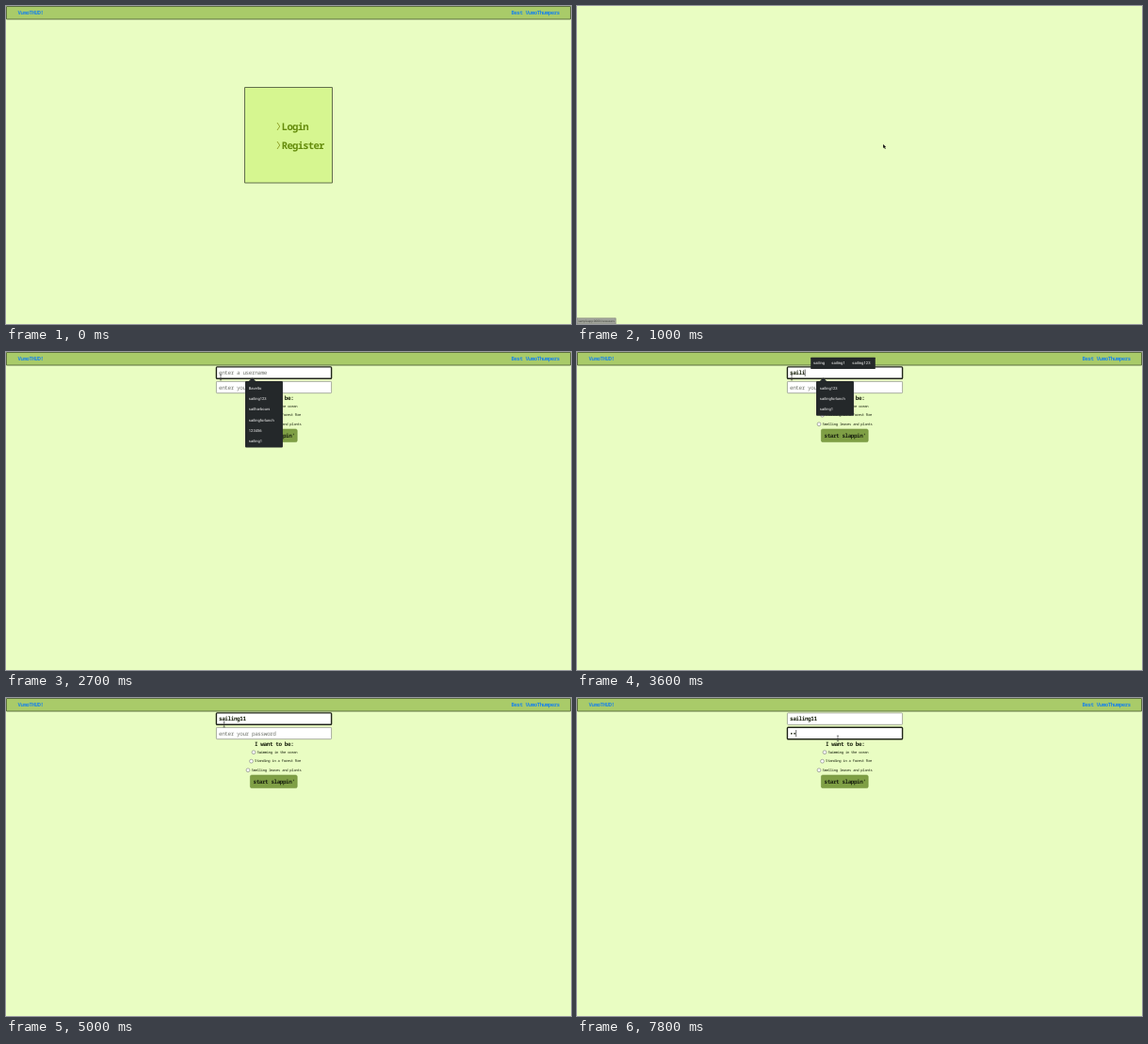
Recreate the animation shown at these times as an HTML page with a canvas. Size 600 by 338 pixels, loop 8 s.

```html
<!DOCTYPE html>
<html lang="en">
<head>
<meta charset="utf-8">
<title>Sign-up form</title>
<style>
  html, body { margin: 0; height: 100%; overflow: hidden; background: #e9fdc2; }
  canvas { display: block; width: 600px; height: 338px; }
</style>
</head>
<body>
<canvas id="stage"></canvas>
<script>
const LOOP = 8000;
const MONO = '"Noto Sans Mono", "DejaVu Sans Mono", monospace';
const SANS = 'Roboto, "Open Sans", sans-serif';
const LINK = '#1f86e4', INK = '#1c2410', POPUP = '#24282a';

const TIME = {
  blank: 1000, form: 1100, focusName: 1900, openList: 2100,
  suggest: 3200, leaveName: 4900, focusPassword: 5600
};
const NAME = 'sailing11';
const NAME_KEYS = [3000, 3130, 3260, 3390, 3520, 3650, 3780, 4100, 4500];
const PASSWORD_KEYS = [7400, 7700];
const HISTORY = ['Bavelto', 'sailing123', 'sailharbours', 'sailingforlunch', '123456', 'sailing1'];
const SUGGESTIONS = ['sailing', 'sailing1', 'sailing123'];
const CHOICES = [
  ['Swimming in the ocean', 263, 57.5],
  ['Standing in a forest ﬁre', 260.5, 67],
  ['Smelling leaves and plants', 257, 76.5]
];
// Pointer path: time, x, y
const PATH = [
  [100, 571, 7], [850, 325, 147], [1100, 325, 147], [1550, 225.5, 35.5], [1650, 225.5, 35.5],
  [1850, 228, 27], [4900, 228, 27], [5500, 276, 41], [5700, 277, 42], [5800, 277, 43]
];

const canvas = document.getElementById('stage');
const ctx = canvas.getContext('2d');
const ratio = window.devicePixelRatio || 1;
canvas.width = 600 * ratio;
canvas.height = 338 * ratio;

function text(str, x, y, size, color, weight = 400, family = MONO, align = 'left') {
  ctx.font = `${weight} ${size}px ${family}`;
  ctx.letterSpacing = family === MONO ? `${-0.07 * size}px` : '0px';
  ctx.textRendering = 'geometricPrecision';
  ctx.textAlign = align;
  ctx.fillStyle = color;
  ctx.fillText(str, x, y);
}

function box(x, y, w, h, fill, stroke, line = 1, radius = 0) {
  ctx.beginPath();
  ctx.roundRect(x, y, w, h, radius);
  ctx.fillStyle = fill;
  ctx.fill();
  if (!stroke) return;
  ctx.strokeStyle = stroke;
  ctx.lineWidth = line;
  ctx.stroke();
}

function lines(color, width, ...paths) {
  ctx.beginPath();
  for (const path of paths) path.forEach(([x, y], i) => i ? ctx.lineTo(x, y) : ctx.moveTo(x, y));
  ctx.strokeStyle = color;
  ctx.lineWidth = width;
  ctx.stroke();
}

function polygon(fill, ...points) {
  ctx.beginPath();
  points.forEach(([x, y]) => ctx.lineTo(x, y));
  ctx.fillStyle = fill;
  ctx.fill();
}

const typed = (keys, t) => keys.filter(k => k <= t).length;

function caretOn(t, focus, keys) {
  const last = Math.max(focus, ...keys.filter(k => k <= t));
  return Math.floor((t - last) / 500) % 2 === 0;
}

function drawNav() {
  box(0.5, 0.5, 599, 13.5, '#a9cb69', '#5d7040');
  text('VumoTHUD!', 12.5, 9.4, 5.7, LINK, 700);
  text('Best VumoThumpers', 587.8, 9.4, 5.7, LINK, 700, MONO, 'right');
}

function drawWelcome() {
  box(253.5, 86.5, 93, 101.5, '#d6f690', '#62704c');
  [['Login', 128], ['Register', 148]].forEach(([label, y]) => {
    lines('#8a9a20', 0.9, [[288, y - 4], [290.7, y], [288, y + 4]]);
    text(label, 292.8, y + 3.8, 10.6, '#658c0c', 600);
  });
}

function drawField(y, value, hint, focused, caret) {
  box(223.4, y, 122.2, 12.4, '#fff', focused ? '#22261c' : '#93998c', focused ? 1.4 : 0.8, 0.8);
  text(value || hint, 226, y + 8.5, 6, value ? INK : '#747870', value ? 600 : 400);
  if (caret) {
    const x = 226.3 + value.length * 3.18;
    lines('#111', 0.6, [[x, y + 2.6], [x, y + 10]]);
  }
}

function drawForm(t) {
  const name = NAME.slice(0, typed(NAME_KEYS, t));
  const onPassword = t >= TIME.focusPassword;
  const onName = t >= TIME.focusName && !onPassword;
  drawField(15.9, name, 'enter a username', onName, onName && caretOn(t, TIME.focusName, NAME_KEYS));
  drawField(31.3, '•'.repeat(typed(PASSWORD_KEYS, t)), 'enter your password', onPassword,
    onPassword && caretOn(t, TIME.focusPassword, PASSWORD_KEYS));

  text('I want to be:', 264, 51.4, 6, INK, 700);
  for (const [label, x, y] of CHOICES) {
    box(x - 1.9, y - 1.7, 3.8, 3.8, '#fff', '#777', 0.6, 1.9);
    text(label, x + 3.6, y + 1.3, 3.85, INK, 500);
  }
  box(259.4, 82, 49.8, 13.6, '#7f9f45', '#718f3c', 0.6, 1.5);
  text("start slappin'", 262.5, 91.2, 5.95, INK, 700);

  if (t >= TIME.openList && t < TIME.leaveName) drawHistory(HISTORY.filter(s => s.startsWith(name)));
  if (t >= TIME.suggest && t < TIME.leaveName) drawSuggestions();
}

function drawHistory(items) {
  if (!items.length) return;
  ctx.font = `400 4.1px ${SANS}`;
  ctx.letterSpacing = '0px';
  const width = Math.max(30, ...items.map(s => ctx.measureText(s).width + 13));
  box(254, 31, width, items.length * 11.25 + 3, POPUP, null, 0, 1);
  polygon(POPUP, [257.5, 31.2], [261.5, 27.6], [265.5, 31.2]);
  items.forEach((s, i) => text(s, 257.8, 39.9 + i * 11.25, 4.1, '#f4f4f4', 400, SANS));
}

function drawSuggestions() {
  box(248.2, 5.7, 68.6, 12.3, POPUP, null, 0, 0.6);
  [251, 270.3, 292.3].forEach((x, i) => text(SUGGESTIONS[i], x, 13.4, 4.2, '#f4f4f4', 400, SANS));
}

function drawStatus() {
  box(0, 331.8, 41.2, 6.2, '#a2a59c', '#7d8078', 0.6);
  text('sampleapp:0000/newusers', 1.2, 336.2, 3.2, '#3c3f3a', 400, SANS);
}

function pointerAt(t) {
  const next = PATH.findIndex(p => p[0] > t);
  if (next < 0) return PATH[PATH.length - 1].slice(1);
  const [t0, x0, y0] = PATH[next - 1], [t1, x1, y1] = PATH[next];
  const p = (t - t0) / (t1 - t0), e = p * p * (3 - 2 * p);
  return [x0 + (x1 - x0) * e, y0 + (y1 - y0) * e];
}

function drawPointer(t) {
  if (t < PATH[0][0]) return;
  const [x, y] = pointerAt(t);
  const overField = t >= TIME.form && x > 223 && x < 346 && y > 15 && y < 45;
  if (overField) {
    lines('#333', 0.6, [[x, y - 2.6], [x, y + 2.6]],
      [[x - 1.1, y - 2.8], [x + 1.1, y - 2.8]], [[x - 1.1, y + 2.8], [x + 1.1, y + 2.8]]);
  } else {
    polygon('#111', [x, y], [x + 0.2, y + 4], [x + 1.1, y + 3.3], [x + 2, y + 5],
      [x + 2.8, y + 4.6], [x + 2, y + 3], [x + 3.1, y + 2.8]);
  }
}

function draw(t) {
  ctx.setTransform(ratio, 0, 0, ratio, 0, 0);
  box(0, 0, 600, 338, '#e9fdc2');
  if (t < TIME.blank) {
    drawNav();
    drawWelcome();
  } else if (t >= TIME.form) {
    drawNav();
    drawForm(t);
  }
  const overLink = (t >= 100 && t < 200) || (t >= 700 && t < TIME.form);
  if (overLink) drawStatus();
  drawPointer(t);
}

const start = performance.now();
function tick() {
  draw((performance.now() - start) % LOOP);
  requestAnimationFrame(tick);
}
tick();
</script>
</body>
</html>
```
